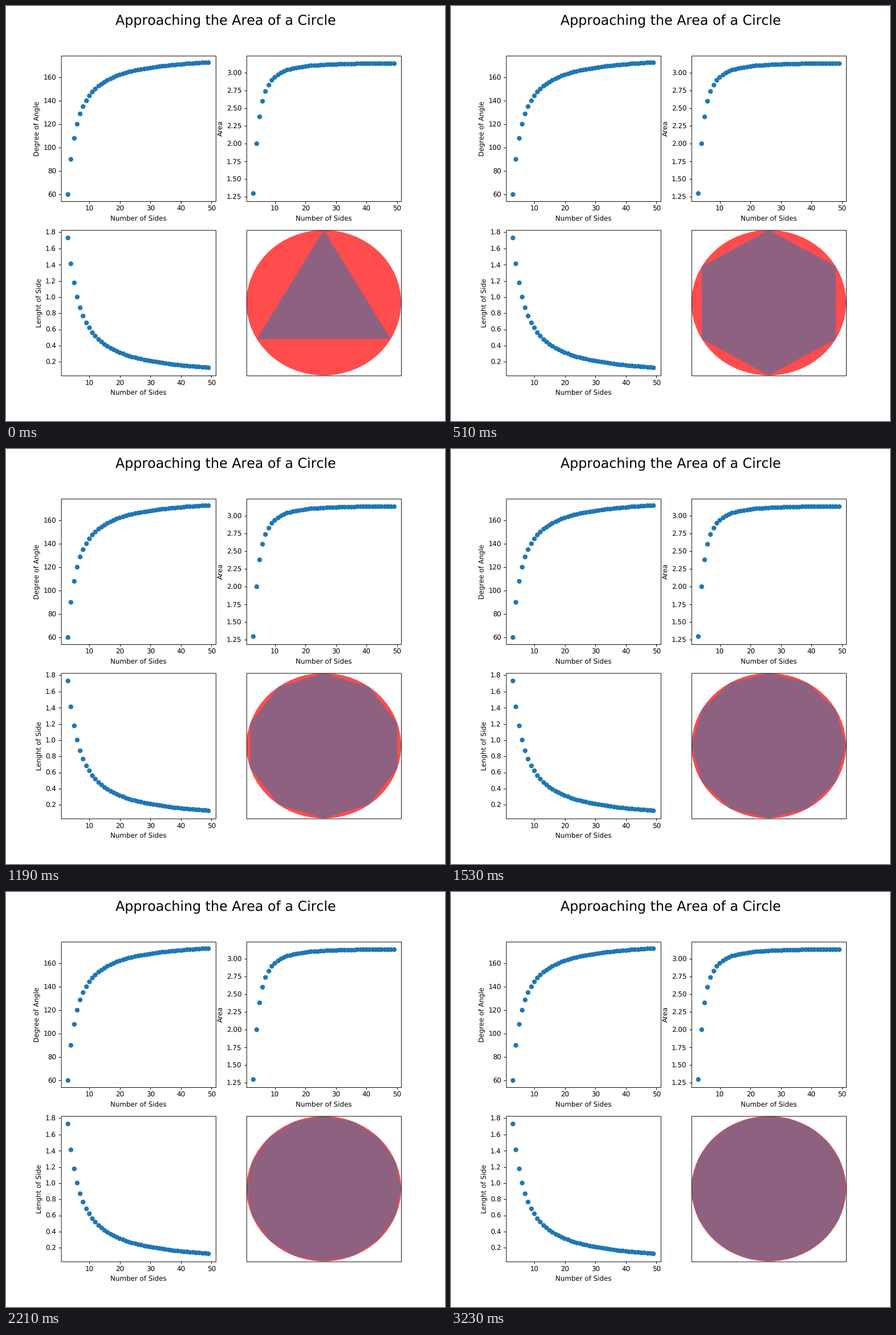
These frames come from a looping animation (770 px wide and 727 px high, 3400 ms). A matplotlib script:

```python
import numpy as np
import matplotlib.pyplot as plt
from matplotlib.animation import FuncAnimation
from matplotlib.patches import Circle, Polygon, Rectangle

WIDTH, HEIGHT = 770, 727
DPI = WIDTH / 9
GRID = np.array([900, 850])  # layout grid: 9 x 8.5 inches at 100 dpi
FRAMES, INTERVAL = 20, 170
FIRST_SIDES = 3
BLUE = "#1f77b4"
MARKER_RADIUS = 3 * DPI / 72  # pixels

plt.rcParams.update({
    "font.family": "DejaVu Sans",
    "text.hinting": "none",
    "text.kerning_factor": 6,
})

fig, axes = plt.subplots(
    2, 2, figsize=((WIDTH + 0.001) / DPI, (HEIGHT + 0.001) / DPI), dpi=DPI)
fig.subplots_adjust(left=0.125, right=0.9, bottom=0.11, top=0.88,
                    wspace=0.2, hspace=0.2)
fig.suptitle("Approaching the Area of a Circle", fontsize=20)


def snap(points, offset=0.0):
    """Round figure fractions to the layout grid, counted from the top left."""
    cells = points * [1, -1] * GRID + [0, GRID[1]]
    cells = np.floor(cells + 0.5 + 1e-6) + offset
    return cells * [1, -1] / GRID + [0, 1]


def draw_frame(ax):
    ax.spines[:].set_visible(False)
    low, high = snap(ax.get_position().get_points(), 0.5)
    fig.add_artist(Rectangle(low, *(high - low), fill=False, edgecolor="black",
                             linewidth=0.8, snap=False,
                             transform=fig.transFigure))


def padded_limits(values, axis_pixels):
    """Data range widened by the marker radius, then by a 5 % margin."""
    pad = MARKER_RADIUS / axis_pixels
    low, high = values.min() - pad, values.max() + pad
    margin = 0.05 * (high - low)
    return low - margin, high + margin


def scatter_panel(ax, x, y, ylabel):
    box = ax.get_position()
    ax.set_xlim(padded_limits(x, box.width * WIDTH))
    ax.set_ylim(padded_limits(y, box.height * HEIGHT))
    to_figure = ax.transData - fig.transFigure
    points = snap(to_figure.transform(np.column_stack([x, y])))
    # One colour per point keeps the markers off the screen's pixel grid.
    ax.scatter(*points.T, s=36, c=[BLUE] * len(x), transform=fig.transFigure)
    ax.set_xlabel("Number of Sides")
    ax.set_ylabel(ylabel)


def polygon_points(n):
    angles = np.pi / 2 + 2 * np.pi * np.arange(n) / n
    return np.column_stack([np.cos(angles), np.sin(angles)])


sides = np.arange(3, 50)
scatter_panel(axes[0, 0], sides, 180 * (sides - 2) / sides, "Degree of Angle")
scatter_panel(axes[0, 1], sides, sides / 2 * np.sin(2 * np.pi / sides), "Area")
scatter_panel(axes[1, 0], sides, 2 * np.sin(np.pi / sides), "Lenght of Side")

shape_ax = axes[1, 1]
shape_ax.set(xlim=(-1, 1), ylim=(-1, 1), xticks=[], yticks=[])
shape_ax.add_patch(Circle((0, 0), 1, facecolor="red", alpha=0.7, linewidth=0))
polygon = shape_ax.add_patch(
    Polygon(polygon_points(FIRST_SIDES), facecolor=BLUE, alpha=0.5,
            linewidth=0))

for panel in axes.flat:
    draw_frame(panel)


def update(frame):
    polygon.set_xy(polygon_points(FIRST_SIDES + frame))
    return (polygon,)


anim = FuncAnimation(fig, update, frames=FRAMES, interval=INTERVAL,
                     repeat=True, repeat_delay=0)
plt.show()
```
